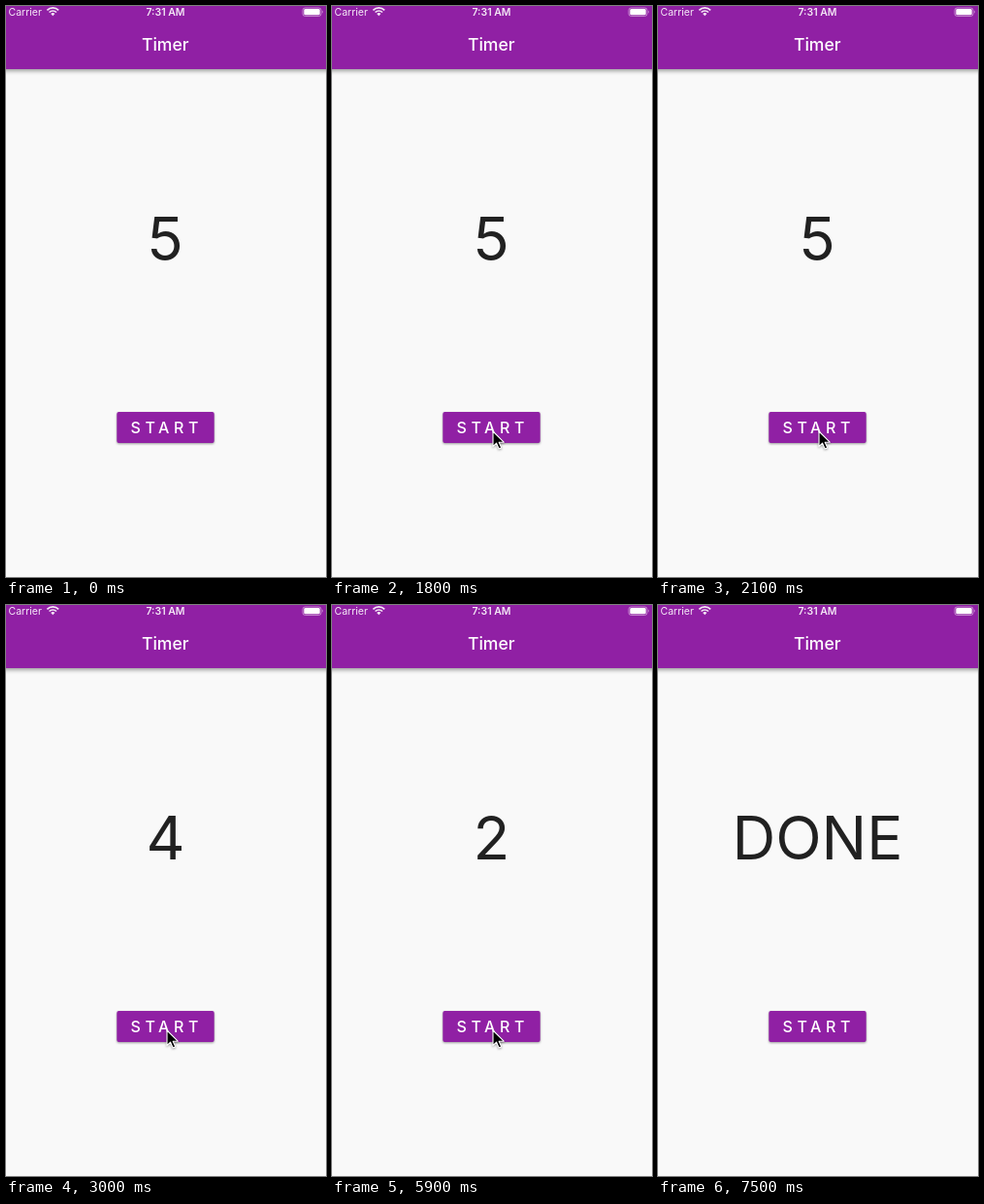
Recreate the animation shown at these times as an HTML page. Size 330 by 588 pixels, loop 9900 ms.

```html
<!DOCTYPE html>
<html lang="en">
<head>
<meta charset="utf-8">
<title>Timer</title>
<style>
  html, body { margin: 0; width: 100%; height: 100%; overflow: hidden; background: #f9f9f9; }
  svg { display: block; width: 330px; height: 588px; font-family: Inter, Roboto, sans-serif; }
  #bar { filter: drop-shadow(0 2px 2px rgba(0, 0, 0, .38)); }
  #button { filter: drop-shadow(0 1.5px 1.2px rgba(0, 0, 0, .38)); }
  #cursor { filter: drop-shadow(0 1px 1px rgba(0, 0, 0, .35)); }
</style>
</head>
<body>
<svg viewBox="0 0 330 588">
  <rect width="330" height="588" fill="#f9f9f9"/>
  <rect id="bar" x="-10" y="-10" width="350" height="75" fill="#9020a4"/>

  <g fill="#f4e8f6">
    <text x="2.5" y="10" font-size="10.5">Carrier</text>
    <text x="164.5" y="10" font-size="10.5" font-weight="600" text-anchor="middle">7:31 AM</text>
    <path d="M48.3 10.3 L46.2 8 A3 3 0 0 1 50.4 8 Z"/>
    <g fill="none" stroke="#f4e8f6" stroke-width="1.7">
      <path d="M44.6 6.5 A5.3 5.3 0 0 1 52 6.5"/>
      <path d="M42.4 4.3 A8.4 8.4 0 0 1 54.2 4.3"/>
    </g>
    <rect x="306" y="2" width="19" height="8.4" rx="2.4" fill="none" stroke="#d3a5db" stroke-width=".8"/>
    <rect x="307.3" y="3.1" width="16.4" height="6.2" rx="1.3" fill="#fff"/>
    <path d="M326 4.6 Q327.6 6.2 326 7.8 Z" fill="#d3a5db"/>
  </g>
  <text x="164.3" y="46" font-size="17.6" font-weight="500" text-anchor="middle" fill="#fff">Timer</text>

  <text id="count" x="164.5" y="262" font-size="62" text-anchor="middle" fill="#212121">5</text>

  <clipPath id="edge"><rect x="114.3" y="418" width="100.4" height="32" rx="2"/></clipPath>
  <rect id="button" x="114.3" y="418" width="100.4" height="32" rx="2" fill="#9020a4"/>
  <g clip-path="url(#edge)" fill="#fff">
    <rect id="glow" x="114" y="418" width="101" height="32" opacity="0"/>
    <circle id="ripple" cx="166" cy="438" r="0" opacity="0"/>
  </g>
  <text x="128.6" y="440" font-size="16" font-weight="500" letter-spacing="4.6" fill="#fff">START</text>

  <path id="cursor" d="M0 0 V15.6 L3.6 12.2 L6.1 18 L8.7 16.9 L6.2 11.2 H11.2 Z" stroke="#fff" stroke-width="1.1" stroke-linejoin="round" opacity="0"/>
</svg>
<script>
const LOOP = 9900, STEP = 100;
const labels = [[6900, "DONE"], [6000, "1"], [5000, "2"], [3900, "3"], [3000, "4"], [0, "5"]];
const el = id => document.getElementById(id);
const clamp = v => Math.max(0, Math.min(1, v));
const mix = (a, b, u) => a + (b - a) * u;

function draw(t) {
  el("count").textContent = labels.find(([start]) => t >= start)[1];

  // Pointer glides to the button, then fades away after the countdown
  const u = clamp((t - 400) / 700), ease = u * u * (3 - 2 * u);
  const x = mix(244, 166, ease), y = mix(539, 438, ease);
  el("cursor").setAttribute("transform", `translate(${x} ${y})`);
  el("cursor").setAttribute("opacity", t < 400 || t >= 7500 ? 0 : t >= 7400 ? .5 : 1);

  // Tap feedback
  const press = clamp((t - 1800) / 200);
  const on = t > 1800 && t < 2100;
  el("glow").setAttribute("opacity", on ? .06 * press : 0);
  el("ripple").setAttribute("opacity", on ? .05 : 0);
  el("ripple").setAttribute("r", 60 * press);
}

function frame(now) {
  draw(Math.floor(now % LOOP / STEP) * STEP);
  requestAnimationFrame(frame);
}
draw(0);
requestAnimationFrame(frame);
</script>
</body>
</html>
```
